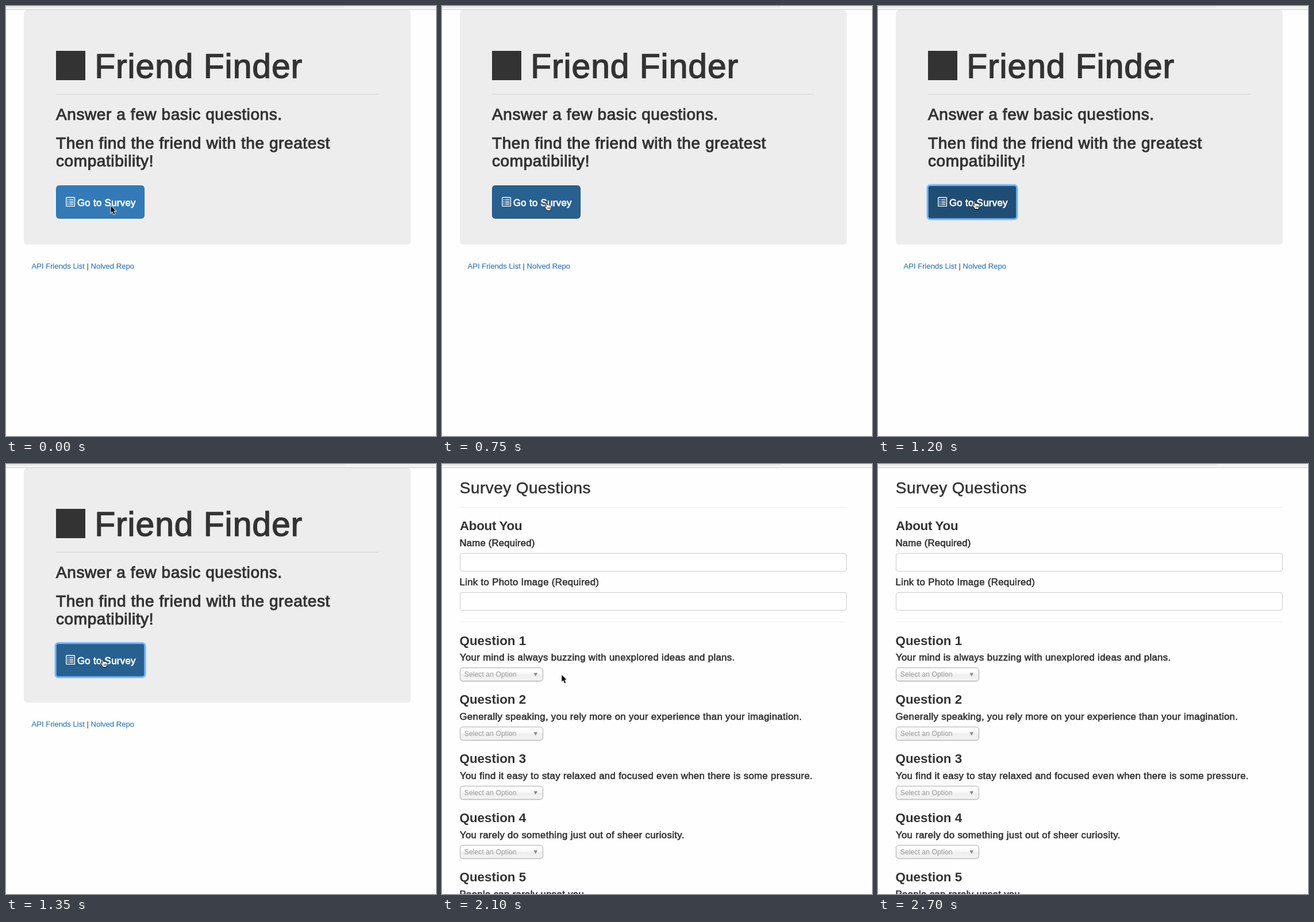
These frames come from a looping animation (748 px wide and 748 px high, 3.16 s). An HTML page:

```html
<!DOCTYPE html>
<html lang="en">
<head>
<meta charset="utf-8">
<title>Friend Finder</title>
<style>
  html, body { margin: 0; width: 100%; height: 100%; overflow: hidden; background: #fefefe; }
  svg { display: block; width: 100%; height: 100%; }
  text { font: 16.8px "Liberation Sans", Arial, sans-serif; fill: #333; white-space: pre; }

  /* Medium weight: regular letters, slightly thickened and spaced */
  .medium { stroke: #333; stroke-width: .036em; letter-spacing: .019em; }
  .hero { font-size: 58.8px; stroke-width: .024em; letter-spacing: .016em; }
  .lead { font-size: 28px; letter-spacing: .021em; }
  .title { font-size: 28px; stroke-width: .018em; letter-spacing: .016em; }
  .section { font-size: 22.4px; font-weight: bold; }
  .section.tight { letter-spacing: -.014em; }
  .medium.tight { letter-spacing: .009em; }
  .label { fill: #fff; stroke: #fff; stroke-width: .045em; }
  .small { font-size: 13.07px; }
  .link { fill: #337ab7; stroke: #337ab7; stroke-width: .015em; }
  .hint { font-size: 12.13px; fill: #999; letter-spacing: .006em; }
  .rule { stroke: #eee; }
  .field { fill: #fff; stroke: #ccc; }

  .home, .survey, .button, .ring, .arrow, .hand { animation: 3160ms step-end infinite; }
  .home { animation-name: home; }
  .survey { animation-name: survey; }
  .button { animation-name: button; }
  .ring { animation-name: ring; }
  .arrow { animation-name: arrow; }
  .hand { animation-name: hand; }

  @keyframes home {
    0% { visibility: visible; }
    52.21%, 100% { visibility: hidden; }
  }
  @keyframes survey {
    0% { visibility: hidden; }
    52.21%, 100% { visibility: visible; }
  }
  @keyframes button {
    0% { fill: #337ab7; stroke: #2e6da4; }
    23.73% { fill: #286090; stroke: #204d74; }
    37.97% { fill: #204d74; stroke: #122b40; }
    42.72%, 100% { fill: #286090; stroke: #204d74; }
  }
  @keyframes ring {
    0% { opacity: 0; }
    37.97%, 100% { opacity: 1; }
  }
  @keyframes arrow {
    0% { opacity: 1; transform: translate(181.5px, 346.5px); }
    18.98% { opacity: 0; transform: translate(181.5px, 346.5px); }
    66.45% { opacity: 1; transform: translate(207.3px, 365.5px); }
    71.2% { opacity: 1; transform: translate(568.3px, 618.5px); }
    75.94% { opacity: 1; transform: translate(639.3px, 707.5px); }
    80.69% { opacity: 1; transform: translate(675.3px, 739.5px); }
    85.44%, 100% { opacity: 0; transform: translate(675.3px, 739.5px); }
  }
  @keyframes hand {
    0% { opacity: 0; transform: translate(180px, 348.5px); }
    18.98% { opacity: 1; transform: translate(180px, 348.5px); }
    23.73% { opacity: 1; transform: translate(177.3px, 340.5px); }
    28.48% { opacity: 1; transform: translate(163.5px, 338px); }
    66.45%, 100% { opacity: 0; transform: translate(163.5px, 338px); }
  }
</style>
</head>
<body>
<svg viewBox="0 0 748 748">
  <defs>
    <linearGradient id="gloss" x2="0" y2="1">
      <stop offset=".2" stop-color="#fff"/>
      <stop offset=".5" stop-color="#f6f6f6"/>
      <stop offset=".52" stop-color="#eee"/>
      <stop offset="1" stop-color="#f4f4f4"/>
    </linearGradient>
    <g id="select">
      <rect x="31.5" y="355.5" width="144" height="23" rx="4.5" fill="none" stroke="#000" stroke-opacity=".08"/>
      <rect x="31.5" y="354.5" width="144" height="23" rx="4.5" fill="url(#gloss)" stroke="#aaa"/>
      <text class="hint" x="38.8" y="370.3">Select an Option</text>
      <path d="M159.5 363.5h6.6l-3.3 6z" fill="#888"/>
    </g>
  </defs>

  <rect width="748" height="748" fill="#fefefe"/>

  <g class="home">
    <rect x="31" y="7" width="673" height="408" rx="5.6" fill="#ededed"/>
    <rect x="87" y="78" width="51" height="51" fill="#333"/>
    <text class="medium hero" x="154.2" y="124.8">Friend Finder</text>
    <path d="M87 153.5H648" stroke="#d5d5d5"/>
    <text class="medium lead" x="87" y="198.3">Answer a few basic questions.</text>
    <text class="medium lead" x="87" y="248">Then find the friend with the greatest</text>
    <text class="medium lead" x="87" y="278.8">compatibility!</text>

    <rect class="button" x="87.5" y="312.5" width="153" height="57" rx="5"/>
    <g class="ring" fill="none" stroke="#6cb1f8">
      <rect x="86" y="311.5" width="156" height="59.5" rx="5" stroke-width="4" stroke-opacity=".4"/>
      <rect x="86.5" y="311.8" width="155" height="58.7" rx="4.5" stroke-width="2.6"/>
    </g>
    <rect x="104.8" y="333" width="14.6" height="15.4" rx=".8" fill="none" stroke="#fff" stroke-width="1.4"/>
    <path d="M107 336.7h1.6m1.5 0h7.2M107 339.6h1.6m1.5 0h7.2M107 342.5h1.6m1.5 0h7.2M107 345.4h1.6m1.5 0h7.2" stroke="#fff" stroke-width="1.3"/>
    <text class="medium label" x="124" y="347.8">Go to Survey</text>

    <text class="small" x="44.6" y="457.3"><tspan class="link">API Friends List</tspan> | <tspan class="link">Nolved Repo</tspan></text>
  </g>

  <g class="survey">
    <text class="medium title" x="30.8" y="50.6">Survey Questions</text>
    <path class="rule" d="M31 75.5H704M31 274.5H704"/>
    <text class="section tight" x="31" y="115">About You</text>
    <text class="medium tight" x="30.5" y="143.2">Name (Required)</text>
    <rect class="field" x="31.5" y="155.5" width="672" height="31" rx="3.5"/>
    <text class="medium" x="30.5" y="211.4">Link to Photo Image (Required)</text>
    <rect class="field" x="31.5" y="223.5" width="672" height="31" rx="3.5"/>

    <g>
      <text class="section" x="30.5" y="314.5">Question 1</text>
      <text class="medium" x="31" y="342.4">Your mind is always buzzing with unexplored ideas and plans.</text>
      <use href="#select"/>
    </g>
    <g transform="translate(0 102.9)">
      <text class="section" x="30.5" y="314.5">Question 2</text>
      <text class="medium" x="30.5" y="342.4">Generally speaking, you rely more on your experience than your imagination.</text>
      <use href="#select"/>
    </g>
    <g transform="translate(0 205.8)">
      <text class="section" x="30.5" y="314.5">Question 3</text>
      <text class="medium" x="31" y="342.4">You find it easy to stay relaxed and focused even when there is some pressure.</text>
      <use href="#select"/>
    </g>
    <g transform="translate(0 308.7)">
      <text class="section" x="30.5" y="314.5">Question 4</text>
      <text class="medium" x="31" y="342.4">You rarely do something just out of sheer curiosity.</text>
      <use href="#select"/>
    </g>
    <g transform="translate(0 411.6)">
      <text class="section" x="30.5" y="314.5">Question 5</text>
      <text class="medium" x="30.5" y="342.4">People can rarely upset you.</text>
    </g>
  </g>

  <!-- Browser edge -->
  <rect width="748" height="6" fill="#f3f3f3"/>
  <path d="M0 6.5H748" stroke="#d0d0d0"/>
  <rect x="-10" y="-20" width="600" height="21.2" rx="4" fill="#fff" stroke="#d4d4d4"/>

  <!-- Pointers -->
  <path class="arrow" d="M1 1.5V13.2L3.7 10.6 6 15.9 8 15 5.7 9.8H9.4Z" stroke="#fff" stroke-width="1.8" paint-order="stroke"/>
  <g class="hand" stroke="#000" stroke-linejoin="round" stroke-linecap="round">
    <path fill="#fff" d="M4.8 15C4.7 13.5 3.4 12.6 2.6 11.2L1 8.9C.3 7.7 1.6 6.9 2.6 7.8L4.1 9.2 2.8 2.6C2.5.8 4.5.3 5 2L6.1 5.9C6.4 4.8 8.1 4.8 8.4 6.2 8.9 5.3 10.3 5.5 10.6 6.8 11.3 6.1 12.6 6.5 12.8 7.7 13.2 9.7 12.9 11 12.2 12.4 11.8 13.3 11.7 14 11.7 15Z"/>
    <path fill="none" stroke-width=".8" d="M6.9 9.8v2.8M8.7 9.8v2.8M10.5 9.8v2.8"/>
  </g>
</svg>
</body>
</html>
```
